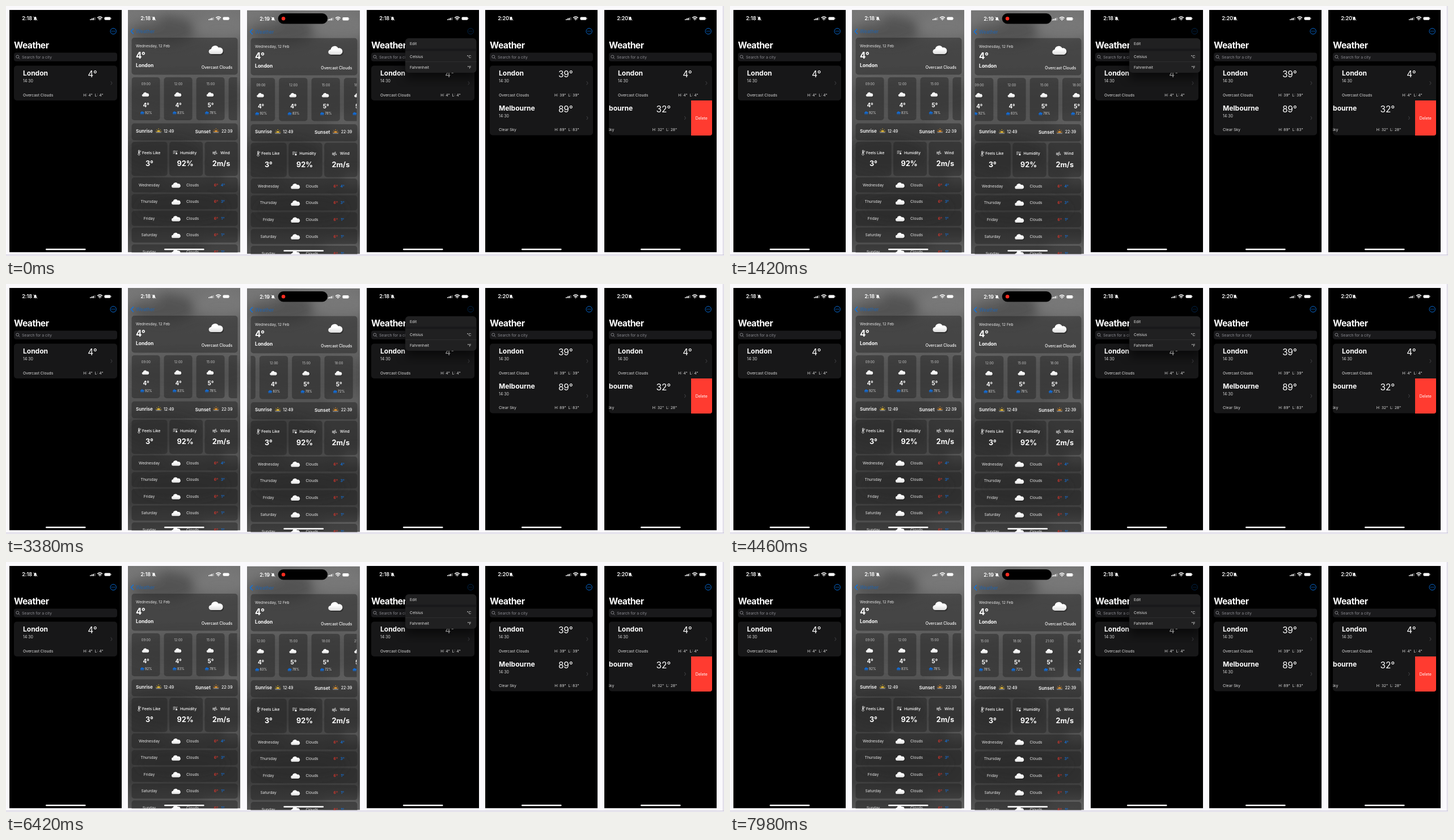
These frames come from a looping animation (1266 by 442 pixels, 8000 ms). An HTML page:

```html
<!DOCTYPE html>
<html lang="en">
<head>
<meta charset="utf-8">
<title>Weather app screens</title>
<style>
html, body { margin: 0; width: 100%; height: 100%; overflow: hidden; background: #faf9fc; }
#stage { display: block; width: 1266px; height: 442px; }
text { font-family: Inter, "Noto Sans", sans-serif; white-space: pre; }
</style>
</head>
<body>
<svg id="stage" viewBox="0 0 1266 442" xmlns="http://www.w3.org/2000/svg"></svg>
<script>
const BLUE = '#0a74e6', RED = '#ff3b30', LIGHT = '#dedede';
const CARD_STEP = 57, LOOP = 8000;

const text = (x, y, size, str, { fill = '#fff', weight = 400, anchor = 'start', extra = '' } = {}) =>
  `<text x="${x}" y="${y}" font-size="${size}" fill="${fill}" font-weight="${weight}" text-anchor="${anchor}" ${extra}>${str}</text>`;
const mid = (x, y, size, str, opts = {}) => text(x, y, size, str, { ...opts, anchor: 'middle' });
const box = (x, y, w, h, r, fill, extra = '') =>
  `<rect x="${x}" y="${y}" width="${w}" height="${h}" rx="${r}" fill="${fill}" ${extra}/>`;
const line = (d, color, width = 1) =>
  `<path d="${d}" fill="none" stroke="${color}" stroke-width="${width}" stroke-linecap="round" stroke-linejoin="round"/>`;
const at = (x, y, body, scale = 1) => `<g transform="translate(${x} ${y}) scale(${scale})">${body}</g>`;
const clip = (x, y, w, h, body) => `<svg x="${x}" y="${y}" width="${w}" height="${h}" viewBox="${x} ${y} ${w} ${h}">${body}</svg>`;

const CLOUD = 'M-8 7.5A4.5 4.5 0 0 1-8.5-1.5A7 7 0 0 1 4.5-4A5.8 5.8 0 0 1 8 7.5Z';
const cloud = (x, y, scale) => at(x, y,
  `<path d="${CLOUD}" transform="translate(1.5 2)" fill="#000" opacity=".3"/><path d="${CLOUD}" fill="url(#cloud)"/>`, scale);

function statusBar(time) {
  const bars = [0, 1, 2, 3].map(i =>
    box(142 + i * 2.6, 16.2 - i * 1.1, 1.7, 1.8 + i * 1.1, .5, '#fff', i > 2 ? 'opacity=".4"' : '')).join('');
  const bell = '<path d="M-3 2.4Q-2 1.4-2-.6A2 2.3 0 0 1 2-.6Q2 1.4 3 2.4ZM-1 3H1Q0 4.2-1 3Z" fill="#fff"/>'
    + line('M-3.4-3L3.4 3.2', '#fff', .8);
  const wifi = line('M-4-1.4Q0-4.8 4-1.4M-2.3.7Q0-1.2 2.3.7', '#fff', 1.4) + '<circle cy="2.2" r="1" fill="#fff"/>';
  return text(22.2, 18.1, 9.1, time, { weight: 600, extra: 'letter-spacing="-.15"' }) + at(45.6, 15, bell) + bars + at(159.5, 15, wifi)
    + box(167.5, 12.4, 11, 5.4, 1.7, '#fff') + box(179, 14.2, .9, 1.8, .4, '#aaa');
}

const homeBar = box(64, 422, 70.5, 2.4, 1.2, '#fff');

function cityRow(y, city, condition, temp, range) {
  return at(0, y,
    text(24, 116.3, 12, city, { weight: 700 })
    + text(24, 128, 6.9, '14:30', { fill: LIGHT })
    + text(154.8, 119.3, 15.3, temp, { anchor: 'end' })
    + line('M179 126.6L181 129.3L179 132', '#4a4a4d', .9)
    + text(24, 152.6, 6.8, condition, { fill: LIGHT })
    + text(165.5, 152.6, 6.8, range, { fill: LIGHT, anchor: 'end' }));
}
const london = (temp = '4°') => cityRow(0, 'London', 'Overcast Clouds', temp, `H: ${temp}\u00a0 L: ${temp}`);

function listScreen(time, rows, count, over = '', dim = 1) {
  const dots = [-2.4, 0, 2.4].map(x => `<circle cx="${x}" r=".75" fill="${BLUE}"/>`).join('');
  return box(0, 0, 198, 428.5, 0, '#000') + statusBar(time)
    + `<g opacity="${dim}">${at(183.2, 37.6, `<circle r="5.2" fill="none" stroke="${BLUE}" stroke-width=".9"/>${dots}`)}</g>`
    + text(8, 67.6, 15.6, 'Weather', { weight: 700, extra: 'letter-spacing="-.5"' })
    + box(8, 75.6, 182, 15.2, 4, '#19191b')
    + `<circle cx="14.3" cy="82.6" r="2.5" fill="none" stroke="#98989d" stroke-width=".8"/>`
    + line('M16.2 84.5L18 86.4', '#98989d', .8)
    + text(22, 85.6, 6.8, 'Search for a city', { fill: '#8c8c92' })
    + box(8, 98.5, 182, 61.5 * count, 5, '#171718') + rows + over + homeBar;
}

const menu = box(68, 78, 125.5, 44, 6, '#000', 'opacity=".55" filter="url(#soft)"')
  + box(68, 50, 125.5, 61, 6, '#202021')
  + box(68, 68.5, 125.5, 4, 0, '#18181a') + box(68, 91.3, 125.5, .6, 0, '#38383a')
  + text(76, 61.5, 6.8, 'Edit', { fill: LIGHT })
  + text(76, 84.5, 6.8, 'Celsius', { fill: LIGHT }) + text(184.5, 84.5, 6.8, '°C', { fill: LIGHT, anchor: 'end' })
  + text(76, 103.5, 6.8, 'Fahrenheit', { fill: LIGHT }) + text(184.5, 103.5, 6.8, '°F', { fill: LIGHT, anchor: 'end' });

const swiped = clip(8, 160, 182, 62,
  at(-37.5, 0, cityRow(61.7, 'Melbourne', 'Clear Sky', '32°', 'H: 32°\u00a0 L: 28°'))
  + `<path d="M153 160H190V218Q190 222 186 222H153Z" fill="${RED}"/>` + mid(171.3, 193.6, 7, 'Delete'));

function backdrop() {
  const blobs = [
    [62, 36, 56, 26, '#4a4a4a', .7], [165, 30, 50, 22, '#858585', .45], [20, 15, 40, 16, '#808080', .4],
    [110, 150, 120, 30, '#484848', .4], [180, 200, 40, 12, '#777', .35], [60, 255, 70, 30, '#333', .5],
    [110, 296, 50, 6, '#6c6c6c', .4], [186, 296, 22, 12, '#808080', .4], [95, 350, 80, 24, '#303030', .4], [180, 420, 50, 14, '#777', .4]
  ];
  return box(0, 0, 198, 428.5, 0, 'url(#sky)') + '<g filter="url(#soft)">'
    + blobs.map(([x, y, rx, ry, c, o]) => `<ellipse cx="${x}" cy="${y}" rx="${rx}" ry="${ry}" fill="${c}" opacity="${o}"/>`).join('') + '</g>';
}

const glass = (x, y, w, h) => box(x, y, w, h, 5, '#202020', 'fill-opacity=".45"');

const HOURS = [['09:00', 4, 92], ['12:00', 4, 83], ['15:00', 5, 78], ['18:00', 5, 72], ['21:00', 5, 78], ['00:00', 3, 80]];
function hourCard([time, temp, rain], i) {
  const drops = line('M-2 2.6L-2.5 3.8M.3 2.6L-.2 3.8M2.4 2.6L1.9 3.8', '#1468cc', .7);
  return at(i * CARD_STEP, 0, glass(6.5, 119, 50, 76)
    + mid(31.8, 133.4, 5.7, time, { fill: '#c4c4c4' })
    + cloud(31, 149.4, .5)
    + mid(32, 172.2, 10, `${temp}°`, { weight: 700 })
    + at(25.3, 181.4, `<path d="${CLOUD}" fill="#1468cc" transform="scale(.29)"/>${drops}`, .95)
    + text(30, 184, 5.6, `${rain}%`, { fill: LIGHT }));
}

function sun(x, color) {
  return at(x, 213.5, `<path d="M-2.8 2A2.8 2.8 0 0 1 2.8 2Z" fill="${color}"/>`
    + line('M0-3.8V-2.4M-3.4-2.2L-2.5-1.3M3.4-2.2L2.5-1.3M-4.8 1H-3.8M4.8 1H3.8', color, .8)
    + line('M-4.4 3.2H4.4', '#ddd', .7));
}

const ICONS = {
  heat: line('M-1-4V1.2A2 2 0 1 0 1 1.2V-4A1 1 0 0 0-1-4M0-2V2.5M2.5-3.5H3.6M2.5-1.6H3.6', '#fff', .8),
  humid: line('M-4-3Q-2-4.2 0-3T4-3M-4-.7Q-2-1.9 0-.7M-4 1.6Q-2.5.6-1 1.6', '#fff', .8)
    + '<path d="M2.3-1.3Q5.6 3.3 2.3 3.4T2.3-1.3Z" fill="#fff"/>',
  wind: line('M-4-1.2H1Q3-1.4 2.4-2.8T.5-2.4M-4 .4H3.2Q5 .7 4 2T2.4 1.8M-4 2H0Q1.4 2.5.5 3.6T-.8 3.2', '#fff', .8)
};
const metric = (x, w, icon, iconX, labelX, label, valueX, value) =>
  glass(x, 233, w, 60.5) + at(iconX, 252.3, ICONS[icon], .9)
  + text(labelX, 254.7, 6.8, label, { weight: 500 }) + mid(valueX, 276.4, 12.6, value, { weight: 700 });

const DAYS = [['Wednesday', 4], ['Thursday', 3], ['Friday', 1], ['Saturday', 1], ['Sunday', 1]];
const dayRow = ([day, low], i) => at(0, i * 29.6,
  glass(6.5, 296, 187, 26.5) + mid(37.5, 311.5, 6.7, day, { fill: '#e8e8e8' }) + cloud(85, 309.8, .63)
  + mid(114, 311.5, 6.7, 'Clouds', { fill: '#e8e8e8' })
  + mid(155.5, 311.5, 6.7, '6°', { fill: '#dc362d', weight: 600 })
  + mid(167.3, 311.5, 6.7, `${low}°`, { fill: '#1470d8', weight: 600 }));

function detailScreen(time, id, island = '') {
  return backdrop() + island + statusBar(time)
    + line('M9.5 33.6L5.4 37.8L9.5 42', BLUE, 1.4)
    + text(14, 41, 8.4, 'Weather', { fill: '#1766bd', extra: 'opacity=".85"' })
    + glass(6.5, 49, 187, 65.5)
    + text(14, 66.4, 6.6, 'Wednesday, 12 Feb', { fill: '#e8e8e8' })
    + text(14, 86.2, 15.4, '4°', { weight: 700 })
    + text(14, 101.3, 8.5, 'London', { weight: 700 })
    + cloud(155.3, 70.6, 1)
    + mid(157, 103.5, 6.9, 'Overcast Clouds', { weight: 500 })
    + clip(6.5, 119, 186, 77, `<g id="${id}">${HOURS.map(hourCard).join('')}</g>`)
    + glass(6.5, 200.5, 187, 30)
    + text(14, 216.9, 8.1, 'Sunrise', { weight: 600 }) + sun(54, '#f3c433') + text(63, 216.7, 6.9, '12:49', { weight: 500 })
    + text(118.5, 217.6, 8.1, 'Sunset', { weight: 600 }) + sun(155.3, '#f09a2b') + text(165, 216.7, 6.9, '22:39', { weight: 500 })
    + metric(6.5, 63, 'heat', 19.5, 25, 'Feels Like', 37.8, '3°')
    + metric(73, 59, 'humid', 83.5, 92, 'Humidity', 101, '92%')
    + metric(135.5, 58, 'wind', 153.2, 163, 'Wind', 164.5, '2m/s')
    + DAYS.map(dayRow).join('') + homeBar;
}

const screen = (x, y, body, scale = 1) => at(x, y, clip(0, 0, 198, 428.5, body), scale);
const island = box(54.5, 5.5, 86.8, 18.4, 9.2, '#000') + '<circle cx="63.8" cy="14.6" r="3.2" fill="#ff2d20"/>';

const stops = ['#747474', '#686868', '#646464', '#606060', '#565656', '#4c4c4c', '#444', '#3e3e3e', '#3e3e3e', '#565656'];
document.getElementById('stage').innerHTML = `<defs>
  <linearGradient id="sky" x2="0" y2="1">${stops.map((c, i) => `<stop offset="${i / 9}" stop-color="${c}"/>`).join('')}</linearGradient>
  <linearGradient id="cloud" x2="0" y2="1"><stop offset=".4" stop-color="#fff"/><stop offset="1" stop-color="#dcdcdc"/></linearGradient>
  <filter id="soft" x="-30%" y="-30%" width="160%" height="160%"><feGaussianBlur stdDeviation="9"/></filter></defs>`
  + box(0, 0, 1266, 442, 0, '#faf9fc') + box(0, 439.6, 1266, 1.4, 0, '#cfcbdc') + box(1264, 0, 1.2, 441, 0, '#cfcbdc')
  + screen(6, 7, listScreen('2:18', london(), 1))
  + screen(215, 7, detailScreen('2:18', 'still'))
  + screen(425, 7.5, detailScreen('2:19', 'hours', island), 1.005)
  + screen(636, 7, listScreen('2:18', london(), 1, menu, .35))
  + screen(845, 7, listScreen('2:20', london('39°') + cityRow(61.7, 'Melbourne', 'Clear Sky', '89°', 'H: 89°\u00a0 L: 83°'), 2))
  + screen(1055, 7, listScreen('2:20', london() + swiped, 2));

// Carousel position over time: a slow drag, a rest, then a quick swipe.
const KEYS = [[0, 0], [1420, 9.8], [2260, 19], [3380, 34.2], [4460, 49], [5900, 57], [7240, 57], [7980, 114.4], [LOOP, 114.4]];
const secant = i => (KEYS[i + 1][1] - KEYS[i][1]) / (KEYS[i + 1][0] - KEYS[i][0]);
const slopes = KEYS.map((_, i) => {
  if (!i) return .004;
  if (i === KEYS.length - 1) return 0;
  const a = secant(i - 1), b = secant(i);
  return a * b > 0 ? 2 * a * b / (a + b) : 0;
});

function scrollAt(t) {
  const i = KEYS.findIndex((_, k) => t < KEYS[k + 1][0]);
  const [t0, p0] = KEYS[i], [t1, p1] = KEYS[i + 1];
  const d = t1 - t0, u = (t - t0) / d, v = 1 - u;
  return p0 * (1 + 2 * u) * v * v + p1 * u * u * (3 - 2 * u) + d * u * v * (slopes[i] * v - slopes[i + 1] * u);
}

const hours = document.getElementById('hours');
const start = performance.now();
function draw(now) {
  const t = Math.max(0, now - start) % LOOP;
  hours.setAttribute('transform', `translate(${(-7.5 - scrollAt(t)).toFixed(2)} 0)`);
  requestAnimationFrame(draw);
}
draw(start);
</script>
</body>
</html>
```
